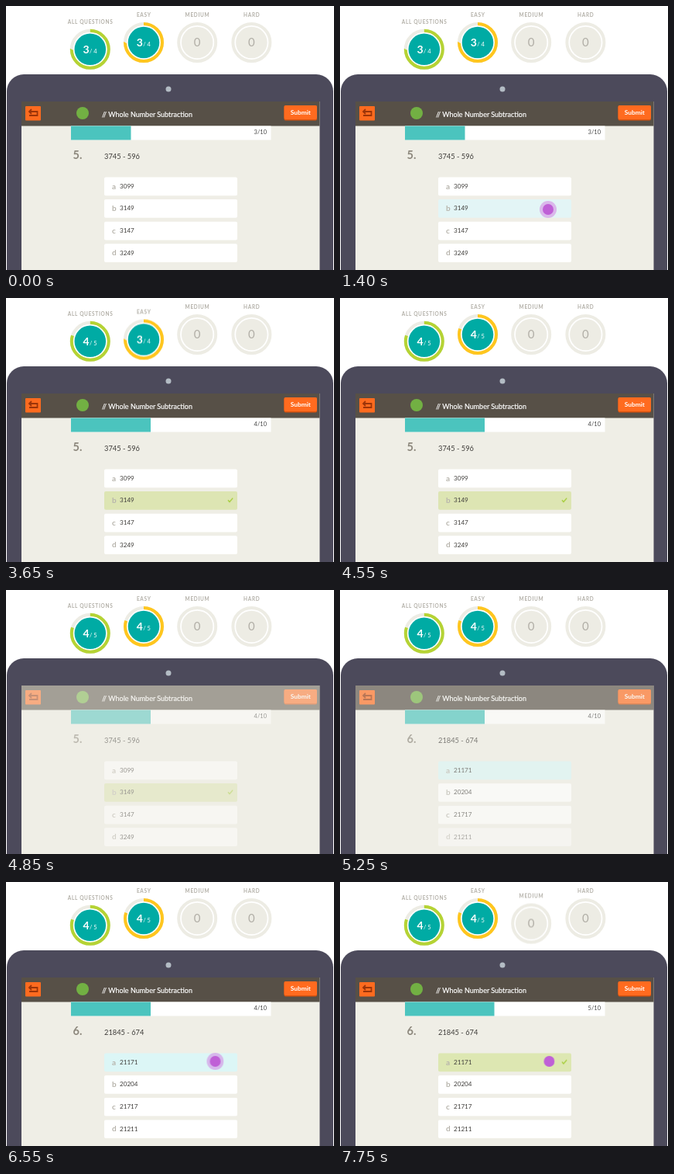
An HTML page that plays this animation: 424 by 340 pixels, repeating every 8 s.

```html
<!DOCTYPE html>
<html lang="en">
<head>
<meta charset="utf-8">
<title>Subtraction quiz</title>
<style>
html, body { margin: 0; width: 100%; height: 100%; overflow: hidden; background: #fff; }
svg { display: block; width: 424px; height: 340px; font-family: Lato, "Open Sans", sans-serif; }

/* every animation shares one 8 s clock and holds each pose until the next */
.anim { animation: 8s step-end infinite; }

.label { font-size: 6.5px; font-weight: 700; letter-spacing: .7px; fill: #b3b0a8; text-anchor: middle; }
.track { fill: none; stroke: #edece4; stroke-width: 4; }
.arc { fill: none; stroke-width: 4; stroke-dasharray: 75 100; }
.big { font-size: 14px; font-weight: 700; }
.small { font-size: 7.5px; }
.count { fill: #fff; }
.zero { font-size: 15px; fill: #b1aea6; text-anchor: middle; }

.title { font-size: 9px; fill: #fff; stroke: #fff; stroke-width: .2px; }
.submit { font-size: 8.4px; font-weight: 700; fill: #fff; text-anchor: middle; }
.step { font-size: 7.5px; fill: #444; text-anchor: end; }
.num { font-size: 14.5px; font-weight: 700; fill: #8c877c; }
.ask { font-size: 9.3px; fill: #3f3d3a; }
.key { font-size: 10px; font-weight: 700; fill: #b7b4ac; }
.opt { font-size: 8.1px; fill: #3f3d3a; }
.row { fill: #fff; }
.tick { fill: none; stroke: #a5cd39; stroke-width: 1.4; opacity: 0; }

.page { animation-name: page; }
@keyframes page {
  60.625% { opacity: .5; }
  63.125% { opacity: .25; }
  65.625% { opacity: .65; }
  68.125% { opacity: 1; }
}

.first { animation-name: first; }
.second { opacity: 0; animation-name: second; }
@keyframes first { 63.125% { opacity: 0; } }
@keyframes second { 63.125% { opacity: 1; } }

/* the new rows arrive one after the other */
.late1 { animation-name: late1; }
.late2 { animation-name: late2; }
.late3 { animation-name: late3; }
@keyframes late1 { 63.125% { opacity: .8; } 65.625% { opacity: .96; } 68.125% { opacity: 1; } }
@keyframes late2 { 63.125% { opacity: .6; } 65.625% { opacity: .88; } 68.125% { opacity: 1; } }
@keyframes late3 { 63.125% { opacity: .3; } 65.625% { opacity: .6; } 68.125% { opacity: 1; } }

.pick1 .row { animation: pick1 8s step-end infinite; }
.pick2 .row { animation: pick2 8s step-end infinite; }
@keyframes pick1 {
  10% { fill: #e3f5f6; }
  25% { fill: #e0edd2; }
  32.5% { fill: #dde5b3; }
}
@keyframes pick2 {
  63.125% { fill: #dcf6f6; }
  89.375% { fill: #ddeed2; }
  96.875% { fill: #dde7b2; }
}
.pick1 .tick { animation: tick1 8s step-end infinite; }
.pick2 .tick { animation: tick2 8s step-end infinite; }
@keyframes tick1 { 32.5% { opacity: 1; } }
@keyframes tick2 { 96.875% { opacity: 1; } }

.bar { animation-name: bar; }
@keyframes bar {
  25% { width: 90px; }
  32.5% { width: 103px; }
  96.875% { width: 115.5px; }
}
.s3 { animation-name: s3; }
.s4, .s5 { opacity: 0; }
.s4 { animation-name: s4; }
.s5 { animation-name: s5; }
@keyframes s3 { 25% { opacity: 0; } }
@keyframes s4 { 25% { opacity: 1; } 96.875% { opacity: 0; } }
@keyframes s5 { 96.875% { opacity: 1; } }

.cursor { opacity: 0; animation-name: cursor; }
@keyframes cursor {
  6.25% { transform: translate(320px, 273px); opacity: 1; }
  10% { transform: translate(292px, 267px); }
  13.75% { transform: translate(269px, 262px); opacity: 1; }
  40% { opacity: .5; }
  45.625% { opacity: 0; }
  74.375% { transform: translate(320px, 256px); opacity: 1; }
  78.125% { transform: translate(288px, 238px); }
  81.875% { transform: translate(270.5px, 231px); opacity: 1; }
}
.halo { opacity: 0; animation-name: halo; }
@keyframes halo {
  17.5% { opacity: .5; }
  25% { opacity: 0; }
  81.875% { opacity: .5; }
  89.375% { opacity: 0; }
}

/* badges: dip, then count up */
.easy { animation-name: easy; }
.medium { animation-name: medium; }
@keyframes easy {
  32.5% { transform: translateY(6.5px); }
  51.25% { transform: none; }
}
@keyframes medium { 96.875% { transform: translateY(6.5px); } }

.all .arc { animation: arcAll 8s step-end infinite; }
.easy .arc { animation: arcEasy 8s step-end infinite; }
@keyframes arcAll { 45.625% { stroke-dasharray: 80 100; } }
@keyframes arcEasy { 51.25% { stroke-dasharray: 80 100; } }
.new { opacity: 0; }
.all .old { animation: offAll 8s step-end infinite; }
.all .new { animation: onAll 8s step-end infinite; }
.easy .old { animation: offEasy 8s step-end infinite; }
.easy .new { animation: onEasy 8s step-end infinite; }
@keyframes offAll { 45.625% { opacity: 0; } }
@keyframes onAll { 45.625% { opacity: 1; } }
@keyframes offEasy { 51.25% { opacity: 0; } }
@keyframes onEasy { 51.25% { opacity: 1; } }
</style>
</head>
<body>
<svg viewBox="0 0 424 340">
  <g id="badges"></g>

  <path d="M1 341V110a22 22 0 0 1 22-22H401a22 22 0 0 1 22 22V341Z" fill="#4c4a5b"/>
  <circle cx="210" cy="107" r="3.5" fill="#b3bcc4"/>
  <rect x="20" y="123" width="385.5" height="218" fill="#efeee6"/>

  <g class="anim page">
    <rect x="20" y="123" width="385.5" height="31.5" fill="#575047"/>
    <rect x="25" y="129" width="20" height="18.5" rx="1" fill="#ff6b1f"/>
    <path d="M30 136H40.5V141H30M33 133L30 136L33 139" fill="none" stroke="#9c3509" stroke-width="1.8"/>
    <circle cx="99" cy="138" r="8" fill="#72b043"/>
    <text class="title" x="124" y="142.5">// Whole Number Subtraction</text>
    <rect x="359.5" y="128" width="42.5" height="19.5" rx="2" fill="#d9530f"/>
    <rect x="359.5" y="128" width="42.5" height="18" rx="2" fill="#ff6b1f"/>
    <text class="submit" x="380.8" y="140">Submit</text>

    <rect x="84" y="154.5" width="258.5" height="18" fill="#fff"/>
    <rect class="anim bar" x="84" y="154.5" width="77.5" height="18" fill="#4bc4be"/>
    <text class="step anim s3" x="337" y="165.3">3/10</text>
    <text class="step anim s4" x="337" y="165.3">4/10</text>
    <text class="step anim s5" x="337" y="165.3">5/10</text>

    <g class="anim first" id="first"></g>
    <g class="anim second" id="second"></g>
  </g>

  <g class="anim cursor">
    <circle class="anim halo" r="11" fill="#d078e0"/>
    <circle r="7" fill="#bf60d6"/>
  </g>
</svg>

<script>
const fill = (id, markup) => { document.getElementById(id).innerHTML = markup; };

function option(text, i, cls) {
  return `<g class="${cls}" transform="translate(127 ${220.5 + i * 28.6})">
    <rect class="row" width="172" height="23.7" rx="2"/>
    <text class="key" x="10" y="15">${"abcd"[i]}</text>
    <text class="opt" x="20" y="14.4">${text}</text>
    <path class="tick" d="M160 11.2l2 2.2l4.2-4.8"/>
  </g>`;
}

function question(num, ask, options, classes) {
  return `<text class="num" x="86.5" y="196.7">${num}.</text>
    <text class="ask" x="127" y="196.7">${ask}</text>` +
    options.map((text, i) => option(text, i, classes[i] || "")).join("");
}

const count = (cls, top, total) => `<g class="count ${cls}">
  <text class="big" x="-9.3" y="5">${top}</text>
  <text class="small" x="-.8" y="5">/ ${total}</text></g>`;

function badge(cls, x, y, name, color) {
  const ring = 'r="24" pathLength="100" transform="rotate(-90)"';
  const inner = color
    ? `<circle class="arc" ${ring} stroke="${color}"/>
       <circle r="20.3" fill="#00aba4"/>` + count("old", 3, 4) + count("new", 4, 5)
    : `<circle r="20.3" fill="#edece4"/><text class="zero" y="5.3">0</text>`;
  return `<g class="anim ${cls}"><g transform="translate(${x} ${y})">
    <text class="label" x=".3" y="-33.3">${name}</text>
    <circle class="track" r="24"/>${inner}</g></g>`;
}

fill("badges",
  badge("all", 108.8, 55.8, "ALL QUESTIONS", "#b5d334") +
  badge("easy", 178, 47, "EASY", "#ffc61e") +
  badge("medium", 247.2, 47, "MEDIUM") +
  badge("hard", 317.4, 47, "HARD"));

fill("first", question(5, "3745 - 596", [3099, 3149, 3147, 3249], ["", "pick1"]));
fill("second", question(6, "21845 - 674", [21171, 20204, 21717, 21211],
  ["pick2", "anim late1", "anim late2", "anim late3"]));
</script>
</body>
</html>
```
